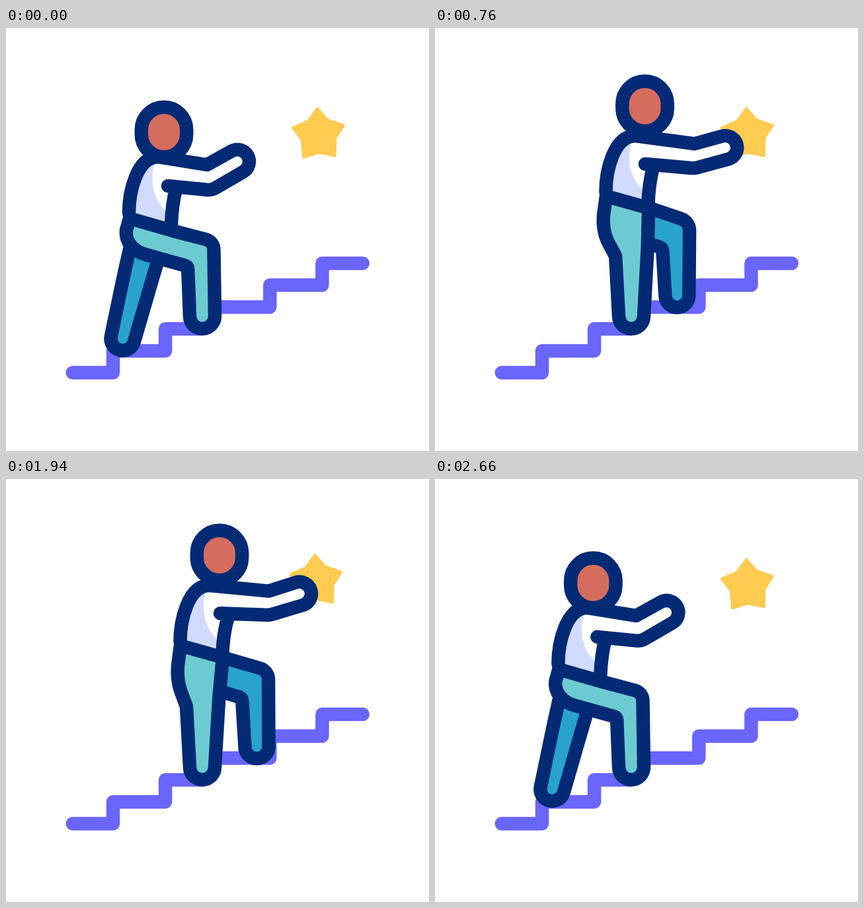
Write an HTML page with a canvas that moves like this. It is 640 by 640 pixels and loops after 3 s.

```html
<!DOCTYPE html>
<html lang="en">
<head>
<meta charset="utf-8">
<title>Climbing to the star</title>
<style>
html, body { margin: 0; width: 100%; height: 100%; overflow: hidden; background: #fff; }
canvas { display: block; width: 640px; height: 640px; }
</style>
</head>
<body>
<canvas id="stage" width="640" height="640"></canvas>
<script>
const ctx = document.getElementById('stage').getContext('2d');
const LOOP = 3000;
const NAVY = '#042a75', SKIN = '#d56d5e', GOLD = '#ffcb50', TEAL = '#6ccbd0',
      BLUE = '#29a2ce', SHADE = '#d2dbfd', STAIR = '#6a65fb', WHITE = '#fff';

const rad = deg => deg * Math.PI / 180;
const ramp = (t, from, to) => Math.min(1, Math.max(0, (t - from) / (to - from)));
const mix = (a, b, k) => a + (b - a) * k;

// Blend two poses: objects holding numbers or [x, y] points.
function blend(a, b, k) {
  if (typeof a === 'number') return mix(a, b, k);
  const out = Array.isArray(a) ? [] : {};
  for (const key in a) out[key] = blend(a[key], b[key], k);
  return out;
}

const frontLeg = [
  { beltL: [187, 288], beltR: [253, 307], knee: [314.3, 323], round: 16,
    crook: [275, 360.5], seat: [212, 343], c1: [193, 338], c2: [180, 324], hip: [182, 306] },
  { beltL: [264, 252], beltR: [328, 270], knee: [322.3, 331], round: 56,
    crook: [273, 344], seat: [264, 320], c1: [260, 308], c2: [259, 295], hip: [260, 282] }
];

const backLeg = [
  { hipR: [235, 335], knee: [222, 378], foot: [176.5, 470], tilt: 14, crook: [178, 375], hipL: [187, 335], round: 18 },
  { hipR: [286, 281], knee: [306, 312], foot: [278, 402.5], tilt: 6, crook: [258, 346], hipL: [245, 330], round: 26 },
  { hipR: [318, 267], knee: [397, 290], foot: [379.5, 405], tilt: 0, crook: [357, 331], hipL: [320, 320], round: 18 }
];

const arm = {
  low:   { elbow: [304, 207], hand: [350, 202], angle: -29, under: [311, 245.5], cap: [245, 239] },
  reach: { elbow: [399, 173], hand: [445.4, 179.5], angle: -15, under: [398, 210], cap: [323, 203.5] },
  high:  { elbow: [390, 147], hand: [435, 134], angle: -38.5, under: [403, 179], cap: [331, 202] }
};

const star = [[471, 121.5], [486, 138.5], [511, 147.5], [498.5, 166.5], [498, 193.5],
              [473, 188.5], [450, 195.5], [447.5, 169], [433.5, 151], [457, 140.5]];

const move = p => ctx.moveTo(...p);
const line = p => ctx.lineTo(...p);
const corner = (p, next, r) => ctx.arcTo(...p, ...next, r);

function fill(color) {
  ctx.fillStyle = color;
  ctx.fill();
}

function outline(color = NAVY, width = 20.5) {
  ctx.strokeStyle = color;
  ctx.lineWidth = width;
  ctx.stroke();
}

// The flight is open behind the standing foot.
function drawStairs() {
  const tread = i => 521.5 - 33.1 * i;
  const riser = i => 162 + 79.1 * i;
  ctx.beginPath();
  ctx.moveTo(100.7, tread(0));
  for (let i = 0; i < 5; i++) {
    if (i === 2) {
      ctx.lineTo(297, tread(i));
      ctx.moveTo(314, tread(i + 1));
      continue;
    }
    ctx.lineTo(riser(i), tread(i));
    ctx.lineTo(riser(i), tread(i + 1));
  }
  ctx.lineTo(539.8, tread(5));
  outline(STAIR);
}

function drawStar(lift) {
  ctx.save();
  ctx.translate(-28 * lift, -51.5 * lift);
  ctx.beginPath();
  star.forEach(line);
  ctx.closePath();
  fill(GOLD);
  outline(GOLD, 3.5);
  ctx.restore();
}

function drawSparks(t) {
  const size = ramp(t, 1000, 1120) - ramp(t, 1700, 1800);
  if (size <= 0) return;
  const out = ramp(t, 1000, 1440);
  for (const side of [-1, 0, 1]) {
    const x = 442 + side * mix(27, 53, out);
    const y = side ? mix(63, 43, out) : mix(51.5, 22.5, out);
    ctx.beginPath();
    ctx.arc(x, y, 10.8 * size, 0, 2 * Math.PI);
    fill(GOLD);
  }
}

function drawBackLeg(step) {
  const half = step < 0.5 ? 0 : 1;
  const leg = blend(backLeg[half], backLeg[half + 1], step * 2 - half);
  const tilt = rad(leg.tilt), side = [18 * Math.cos(tilt), 18 * Math.sin(tilt)];
  const [x, y] = leg.foot;
  ctx.beginPath();
  move(leg.hipR);
  corner(leg.knee, [x + side[0], y + side[1]], leg.round);
  ctx.arc(x, y, 18, tilt, tilt + Math.PI);
  corner(leg.crook, leg.hipL, 6);
  line(leg.hipL);
  ctx.closePath();
  fill(BLUE);
  outline();
}

function drawFrontLeg(step) {
  const leg = blend(frontLeg[0], frontLeg[1], step);
  ctx.beginPath();
  move(leg.beltL);
  line(leg.beltR);
  corner(leg.knee, [316, 436], leg.round);
  ctx.arc(297, 436, 19, 0, Math.PI);
  corner(leg.crook, leg.seat, 5);
  line(leg.seat);
  ctx.bezierCurveTo(...leg.c1, ...leg.c2, ...leg.hip);
  ctx.closePath();
  fill(TEAL);
  outline();
}

function drawHead(step) {
  ctx.beginPath();
  ctx.roundRect(204.8 + 84 * step, 119.8 - 42 * step, 68.4, 75.4, 34.2);
  fill(SKIN);
  outline();
}

function drawTorso(step, lift) {
  const pose = blend(blend(arm.low, arm.reach, step), arm.high, lift);
  const at = (x, y) => [x + 77.5 * step, y - 34 * step];
  const armpit = [pose.cap[0] + 12, pose.cap[1] + 5];
  const angle = rad(pose.angle);

  const back = () => {
    move(at(186, 280));
    ctx.bezierCurveTo(...at(186, 248), ...at(198, 195), ...at(230, 195));
  };
  const sleeve = () => {
    back();
    line(pose.elbow);
    ctx.arc(...pose.hand, 18, angle - Math.PI / 2, angle + Math.PI / 2);
    corner(pose.under, pose.cap, 22);
  };
  const chest = () => ctx.quadraticCurveTo(...at(251, 268), ...at(250, 298));

  ctx.beginPath();
  sleeve();
  line(armpit);
  chest();
  ctx.closePath();
  fill(WHITE);

  ctx.save();
  ctx.clip();
  ctx.beginPath();
  back();
  line(at(226, 203));
  ctx.bezierCurveTo(...at(216, 225), ...at(222, 262), ...at(245, 279));
  line(at(245, 300));
  ctx.closePath();
  fill(SHADE);
  ctx.restore();

  ctx.beginPath();
  sleeve();
  line(pose.cap);
  move(armpit);
  chest();
  outline();
}

function draw(t) {
  const step = ramp(t, 200, 800) - ramp(t, 1967, 2664);
  const lift = ramp(t, 800, 1000) - ramp(t, 1767, 1967);
  ctx.fillStyle = WHITE;
  ctx.fillRect(0, 0, 640, 640);
  ctx.lineCap = ctx.lineJoin = 'round';
  drawStairs();
  drawSparks(t);
  drawStar(lift);
  drawBackLeg(step);
  drawHead(step);
  drawTorso(step, lift);
  drawFrontLeg(step);
}

const start = performance.now();
function tick() {
  draw((performance.now() - start) % LOOP);
  requestAnimationFrame(tick);
}
tick();
</script>
</body>
</html>
```
